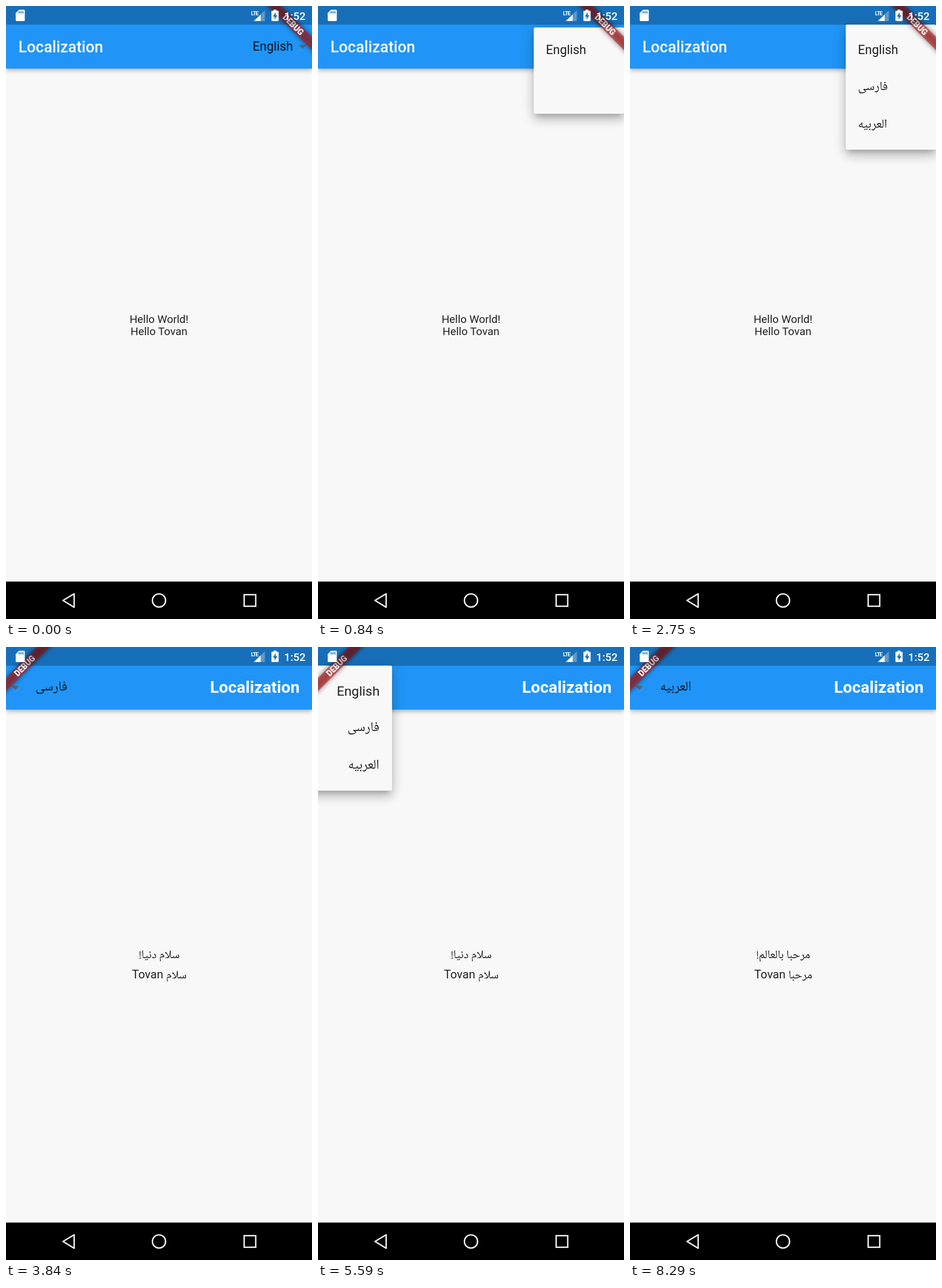
An HTML page that plays this animation: 529x1058 px, repeating every 8.33 s.

```html
<!DOCTYPE html>
<html lang="en">
<head>
<meta charset="utf-8">
<title>Localization</title>
<style>
  html, body { margin: 0; width: 100%; height: 100%; overflow: hidden; background: #f8f8f9; }
  .stage { position: relative; width: 529px; height: 1058px; overflow: hidden; background: #f8f8f9; }
  svg, .menu { position: absolute; left: 0; top: 0; width: 529px; height: 1058px; overflow: hidden; }
  text { font-family: Roboto, sans-serif; fill: #000; fill-opacity: .87; }
  .rtl { direction: rtl; }
  .ar { font-family: "Noto Naskh Arabic", "Noto Sans Arabic", "DejaVu Sans", sans-serif; }
  .title { fill: #fff; fill-opacity: 1; font-size: 26.9px; font-weight: 500; }
  .title.rtl { font-size: 28.3px; font-weight: 700; direction: ltr; text-anchor: end; }
  .body { font-size: 18.86px; text-anchor: middle; }
  .body.rtl { font-size: 20.2px; }
  .item { font-size: 21.55px; }
  .item.rtl { font-size: 22.9px; }

  .bar { position: absolute; left: 0; top: 0; width: 529px; height: 107.5px; background: #2095f7;
    box-shadow: 0 2.7px 5.4px -1.3px #0003, 0 5.4px 6.7px #00000024, 0 1.3px 13.5px #0000001f; }
  .box { position: absolute; width: 156px; border-radius: 2.7px; background: #f8f8f9;
    box-shadow: 0 6.7px 9.1px -4px #0003, 0 10.8px 16.9px 1.3px #00000024, 0 4px 23.1px 2.7px #0000001f; }
  .ltr-box { left: 373px; }
  .rtl-box { left: -28px; }

  .en, .fa, .arabic, .menu, .box, .late { animation: 8330ms linear infinite both; }
  .en { animation-name: en; }
  .fa { animation-name: fa; }
  .arabic { animation-name: arabic; }
  @keyframes en { 0%, 42.677% { opacity: 1 } 42.678%, 100% { opacity: 0 } }
  @keyframes fa { 0%, 42.677% { opacity: 0 } 42.678%, 83.733% { opacity: 1 } 83.734%, 100% { opacity: 0 } }
  @keyframes arabic { 0%, 83.733% { opacity: 0 } 83.734%, 100% { opacity: 1 } }

  /* each menu: fade in, grow from the chosen row, then reveal the other rows */
  .m1 { animation-name: m1; }
  .m2 { animation-name: m2; }
  .ltr-box { animation-name: grow1; }
  .rtl-box { animation-name: grow2; }
  @keyframes m1 { 0%, 8.691% { opacity: 0 } 9.592%, 41.777% { opacity: 1 } 42.677%, 100% { opacity: 0 } }
  @keyframes m2 { 0%, 57.023% { opacity: 0 } 57.923%, 82.833% { opacity: 1 } 83.733%, 100% { opacity: 0 } }
  @keyframes grow1 {
    0%, 9.592% { top: 42.8px; height: 64.6px }
    10.492%, 100% { top: 32.2px; height: 215.5px }
  }
  @keyframes grow2 {
    0%, 57.923% { top: 107.4px; height: 64.6px }
    58.824%, 100% { top: 32.2px; height: 215.5px }
  }
  .r1 { animation-name: r1; }
  .r2 { animation-name: r2; }
  .r3 { animation-name: r3; }
  .r4 { animation-name: r4; }
  @keyframes r1 { 0%, 11.297% { opacity: 0 } 11.897%, 100% { opacity: 1 } }
  @keyframes r2 { 0%, 11.693% { opacity: 0 } 12.293%, 100% { opacity: 1 } }
  @keyframes r3 { 0%, 59.22% { opacity: 0 } 59.82%, 100% { opacity: 1 } }
  @keyframes r4 { 0%, 60.024% { opacity: 0 } 60.624%, 100% { opacity: 1 } }

  .ribbon rect { fill: #b71c1c; fill-opacity: .627; }
  .ribbon .shade { fill: #000; fill-opacity: .5; filter: blur(4px); }
  .ribbon text { font-size: 13.74px; font-weight: 900; fill: #fff; fill-opacity: 1; text-anchor: middle; }
  .status text { fill: #fff; fill-opacity: 1; }
  .status .net { font-size: 9.4px; font-weight: 700; letter-spacing: -1px; }
  .nav { fill: none; stroke: #f4f4f4; stroke-width: 2.4; }
</style>
</head>
<body>
<div class="stage">
  <div class="bar"></div>

  <svg viewBox="0 0 529 1058">
    <defs>
      <path id="arrow" d="M-6.7 67.2H6.7L0 73.9Z" fill="#616161"/>
      <g id="ribbon" class="ribbon">
        <rect class="shade" x="-70" y="37.7" width="140" height="16.2"/>
        <rect x="-70" y="37.7" width="140" height="16.2"/>
        <text x="0" y="50.6">DEBUG</text>
      </g>
    </defs>
    <g class="en">
      <text class="title" x="21.5" y="80.3">Localization</text>
      <text class="item" x="426.5" y="77.3">English</text>
      <use href="#arrow" x="512.8"/>
      <text class="body" x="264.5" y="546.5">Hello World!</text>
      <text class="body" x="264.5" y="568.3">Hello Tovan</text>
    </g>
    <g class="fa">
      <text class="title rtl" x="507.5" y="79">Localization</text>
      <text class="item ar rtl" x="106" y="74.5">فارسی</text>
      <use href="#arrow" x="16.2"/>
      <text class="body ar rtl" x="265" y="537">سلام دنیا!</text>
      <text class="body rtl" x="265" y="572.3"><tspan class="ar">سلام</tspan> Tovan</text>
    </g>
    <g class="arabic">
      <text class="title rtl" x="507.5" y="79">Localization</text>
      <text class="item ar rtl" x="106" y="74.5">العربیه</text>
      <use href="#arrow" x="16.2"/>
      <text class="body ar rtl" x="265" y="537">مرحبا بالعالم!</text>
      <text class="body rtl" x="265" y="572.3"><tspan class="ar">مرحبا</tspan> Tovan</text>
    </g>
  </svg>

  <div class="menu m1">
    <div class="box ltr-box"></div>
    <svg viewBox="0 0 529 1058">
      <text class="item" x="394" y="82.8">English</text>
      <text class="item ar late r1" x="394" y="145.2">فارسی</text>
      <text class="item ar late r2" x="394" y="209.8">العربیه</text>
    </svg>
  </div>
  <div class="menu m2">
    <div class="box rtl-box"></div>
    <svg viewBox="0 0 529 1058">
      <text class="item rtl late r3" x="106.5" y="84">English</text>
      <text class="item ar rtl" x="106" y="145.2">فارسی</text>
      <text class="item ar rtl late r4" x="106" y="209.8">العربیه</text>
    </svg>
  </div>

  <svg viewBox="0 0 529 1058">
    <g class="en"><use href="#ribbon" transform="translate(529 0) rotate(45)"/></g>
    <g class="fa"><use href="#ribbon" transform="rotate(-45)"/></g>
    <g class="arabic"><use href="#ribbon" transform="rotate(-45)"/></g>

    <rect width="529" height="32.3" fill-opacity=".25"/>
    <g class="status" fill="#fff">
      <path d="M22.5 6.5H31Q32.5 6.5 32.5 8V24.5Q32.5 26 31 26H18.3Q16.8 26 16.8 24.5V12.2Z"/>
      <path d="M22.6 9V12.7M25.9 9V12.7M29.2 9V12.7" stroke="#1870ba" stroke-width="1.7"/>
      <text class="net" x="423.5" y="15.5">LTE</text>
      <path d="M428.5 26L447.5 7.5V26Z" fill-opacity=".3"/>
      <path d="M428.5 26L440.3 14.5V26Z"/>
      <path d="M462.5 8.2V6.3H467.5V8.2H470Q471.3 8.2 471.3 9.5V24.7Q471.3 26 470 26H460.2Q458.9 26 458.9 24.7V9.5Q458.9 8.2 460.2 8.2Z"/>
      <path d="M466.3 10.5L461.3 18.2H464.3V23.6L469.2 15.9H466.3Z" fill="#1870ba"/>
      <text x="480.8" y="23.8" font-size="18.86" font-weight="500">1:52</text>
    </g>

    <rect y="993.4" width="529" height="65"/>
    <g class="nav">
      <path d="M117.8 1014.4V1037.8L98.6 1026.1Z" stroke-linejoin="round"/>
      <circle cx="264.5" cy="1026" r="11.4"/>
      <rect x="411.7" y="1016" width="20" height="20"/>
    </g>
  </svg>
</div>
</body>
</html>
```
